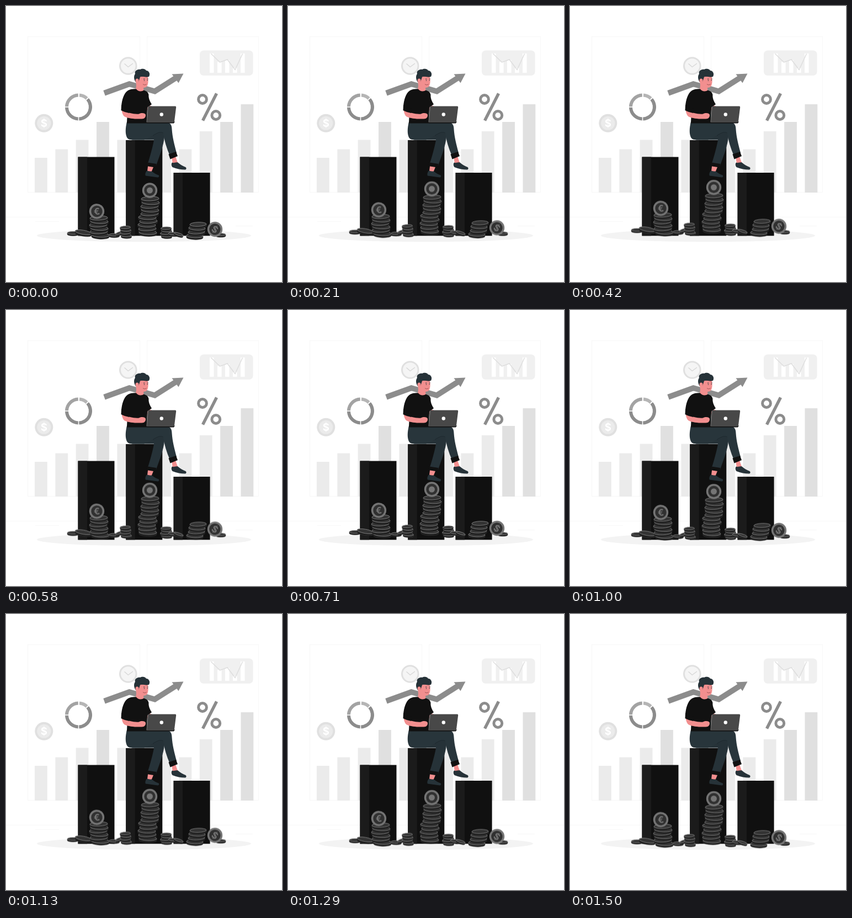
Write an HTML page that moves like this. It is 500x500 px and loops after 1540 ms.

```html
<!DOCTYPE html>
<html lang="en">
<head>
<meta charset="utf-8">
<title>Growth</title>
<style>
  html, body { margin: 0; width: 100%; height: 100%; overflow: hidden; background: #fff; }
  svg { display: block; width: 100%; height: 100%; }
  text { font-family: Inter, "Liberation Sans", sans-serif; font-weight: 700; text-anchor: middle; }
  #coins { animation: bob 1540ms linear -65ms infinite; }
  @keyframes bob {
    0%, 100% { transform: translateY(.85px); }
    50% { transform: translateY(-9.15px); }
  }
</style>
</head>
<body>
<svg viewBox="0 0 500 500">
  <!-- wall -->
  <g fill="none" stroke="#f7f7f7" stroke-width="1">
    <rect x="39.5" y="55.5" width="203" height="282"/>
    <rect x="255.5" y="55.5" width="202" height="282"/>
    <path d="M0 382.5H500M416 398.5H447M53 390.5H96"/>
  </g>
  <g id="bars"></g>

  <rect x="351" y="80.500" width="96.500" height="45.500" rx="7" fill="#f0f0f0"/>
  <path fill="#fff" d="M369 86h7.500v35H369zM383 101h7.500v20H383zM397 98h7.500v23H397zM411 112h7.500v9H411zM425 86h7.500v35H425z"/>
  <path d="M371.500 86.500L387.500 102L401 97L415 115.500L428.500 86.500" fill="none" stroke="#dedede" stroke-width="1.500"/>

  <circle cx="221.300" cy="108.500" r="14.800" fill="#f5f5f5" stroke="#e0e0e0" stroke-width="3"/>
  <path d="M214.500 104.500L221.300 110.500L230 104" fill="none" stroke="#d6d6d6" stroke-width="1.200"/>

  <circle cx="68.800" cy="212.300" r="16.500" fill="#e0e0e0"/>
  <circle cx="68.800" cy="212.300" r="12.500" fill="#ebebeb"/>
  <text x="68.800" y="219" font-size="18.500" fill="#fff">$</text>

  <g fill="none" stroke="#8c8c8c">
    <path d="M178 157.800L223.500 141.200L269.500 154.500L309 129.500" stroke-width="10"/>
    <path d="M300.500 123.500L321.500 122.500L312.500 139.500z" fill="#8c8c8c" stroke="none"/>
    <g stroke-width="5">
      <circle cx="356" cy="169" r="7.400"/>
      <circle cx="380.300" cy="198" r="7.400"/>
      <path d="M381.500 158.500L356.500 207.500" stroke-width="5.500"/>
    </g>
  </g>
  <g id="donut" fill="none" stroke-width="6"></g>

  <ellipse cx="250" cy="416" rx="194" ry="11.300" fill="#f3f3f3"/>
  <g id="towers"></g>

  <!-- person -->
  <g>
    <path d="M258 283L269 287L263.500 300.500L256 299z" fill="#f28f8f"/>
    <path d="M300 273L306.500 271L311.500 285L302 286z" fill="#f28f8f"/>
    <path d="M255.500 298C260 300.500 263 299 265 300C268 303 272 305 276.500 306.500C278 308 277 310.500 275 310.500L253 307.500C251.500 305 253 300 255.500 298z" fill="#263238"/>
    <path d="M301 283.500C305 285 309 282.500 311.500 283.500C315 287 320 290 325.500 292C327.500 294 326.500 296.500 324.500 296.500C317 296.500 309 295 301.500 292C299 289 299.500 285 301 283.500z" fill="#263238"/>

    <path d="M219 210C216 222 216 232 219 238C221 242 226 242.500 232 242.500L268 242.500C266 255 261 272 257 285L272 289C278 272 286 252 287 236L280 212z" fill="#263238"/>
    <path d="M219 210H288C297 210 300.500 215 300.500 223C301.500 238 305 251 309 266L297 271.500C291 258 287 244 284.500 230C274 226 262 239 250 242.500H232C220 242.500 216 238 219 210z" fill="#28353b"/>
    <path d="M284.500 230C280 227 273 230 266 235" fill="none" stroke="#1c262b" stroke-width=".8"/>
    <path d="M256 283.500L272.500 286L270.500 292.500L254.500 290z" fill="#111"/>
    <path d="M294.500 268.500L308 264L311 272L297.500 277.500z" fill="#111"/>

    <path d="M253 178L264 181.500L259 190L252 188z" fill="#f28f8f"/>
    <path d="M234 131C236 141 237 146 234.500 151C236 156.500 245 158.500 249.500 153.500L249 146z" fill="#f28f8f"/>
    <path d="M221 153C226 150.500 231 150 236 150.500C239 154.500 245 156 249.500 152.500C255 154 258 157 258.500 161C258 166 260 172 264 178L256 184L255 211H219L220 190L209 181C210 171 213 158 221 153z" fill="#111"/>
    <path d="M209.500 180L221 192L223 193.500C231 195.500 237 196 241 195.500C246 193 252 194 253 197C253.500 201 251 204.500 246 204.500C235 205 222 204 215 200.500C210 197 209 188 209.500 180z" fill="#f28f8f"/>
    <path d="M209 179C213 183 221 186 225 185L223 194C218 193 212 191 208.500 189z" fill="#111"/>

    <path d="M238 126C242 123 255 123 257 128C258 135 258 142 255 146C251 149.500 243 148 239 143z" fill="#f28f8f"/>
    <path d="M235 138C231 132 231.500 126 234 123C232 118 238 114 243 115C247 112.500 253 114 254 117C259 117 262 123 259 128C254 130 248 127 243 128.500C242 132 241 135 240 137z" fill="#263238"/>
    <ellipse cx="237.500" cy="135" rx="3" ry="3.500" fill="#f28f8f"/>
    <path d="M249 132.300h2.500M255.500 132h2" stroke="#263238" stroke-width=".9"/>
    <circle cx="250.500" cy="135" r=".8" fill="#263238"/>
    <circle cx="256.300" cy="134.500" r=".7" fill="#263238"/>
    <path d="M248 141.500C250 143.500 253 143 254.500 141.500" fill="none" stroke="#8e4747" stroke-width=".9"/>

    <path d="M219 209.500H306L304 212.500H219z" fill="#111"/>
    <path d="M259 181.500H306.500Q308.500 181.500 308.200 183.500L305 209Q304.800 211 302.500 211H254.500L256.500 184Q256.700 181.500 259 181.500z" fill="#484848"/>
    <path d="M257.500 182L255 210" stroke="#777" stroke-width=".8"/>
    <circle cx="281.800" cy="196.500" r="3.200" fill="#fff"/>
  </g>

  <g id="coins"></g>
</svg>
<script>
  const $ = id => document.getElementById(id);
  const rect = (x, y, w, bottom, fill) =>
    `<rect x="${x}" y="${y}" width="${w}" height="${bottom - y}" fill="${fill}"/>`;

  const tops = [275, 259.5, 242.5, 210, 242.5, 242.5, 242.5, 259.5, 227, 210, 178];
  $('bars').innerHTML = tops.map((y, i) =>
    rect(52 + i * 37.35, y, 22.8, 338, [3, 9, 10].includes(i) ? '#e0e0e0' : '#ebebeb')).join('');

  $('towers').innerHTML = [[130.5, 273.5], [217.3, 243], [303.6, 302]].map(([x, y]) =>
    rect(x, y, 66, 416.3, '#101010') + rect(x, y, 16.5, 416.3, '#1b1b1b')).join('');

  const arc = (a, b, color) => {
    const at = d => {
      const r = d * Math.PI / 180;
      return `${131.5 + 21.5 * Math.cos(r)} ${183 + 21.5 * Math.sin(r)}`;
    };
    return `<path d="M${at(a)}A21.5 21.5 0 ${b - a > 180 ? 1 : 0} 1 ${at(b)}" stroke="${color}"/>`;
  };
  $('donut').innerHTML = arc(182, 268, '#a3a3a3') + arc(274, 314, '#b5b5b5') +
    arc(319, 448, '#8c8c8c') + arc(92, 178, '#8c8c8c');

  // flat coin: dark edge with a light rim on the face
  const flat = (x, y, r, tilt = 0) => {
    const ry = r * .25, h = r > 12 ? 3.4 : 2.8;
    return `<g transform="translate(${x} ${y}) rotate(${tilt})">
      <path d="M${-r} 0v${h}a${r} ${ry} 0 0 0 ${2 * r} 0v${-h}z" fill="#1a1a1a" stroke="#454545" stroke-width=".5"/>
      <ellipse rx="${r}" ry="${ry}" fill="#333" stroke="#858585" stroke-width=".9"/></g>`;
  };
  // coins listed by x from the top down, painted from the bottom up
  const stack = (xs, y, step, r) =>
    xs.map((x, i) => flat(x, y + i * step, r, i % 2 ? 2 : -2)).reverse().join('');
  const upright = (x, y, tilt, mark) =>
    `<g transform="translate(${x} ${y}) rotate(${tilt})">
      <circle r="13.7" fill="#757575"/><circle r="10.2" fill="#303030"/>${mark}</g>`;
  const sign = s => `<text y="6" font-size="16.5" fill="#757575">${s}</text>`;

  $('coins').innerHTML =
    flat(121.5, 411, 10.5) + flat(140, 410, 15, 10) +
    stack([168, 169, 167, 169, 168, 171], 384, 6.2, 16) +
    flat(196, 414.5, 9.5) + flat(206, 411, 8, -18) +
    stack([216, 217, 216, 218], 401, 5, 9.5) +
    stack([261, 262, 260, 261, 260, 256, 258, 255, 256, 257], 349, 6.8, 16) +
    stack([290, 291, 289, 291], 402.5, 4.6, 9.5) +
    flat(304, 412.5, 10, 3) + flat(313, 413.5, 8.5, 18) +
    stack([348, 346, 345, 342], 395.5, 6.9, 15) +
    flat(389, 414, 9) +
    upright(164.5, 372, -6, sign('€')) +
    upright(260.5, 334, 0, '<circle r="5.5" fill="#757575"/>') +
    upright(378.5, 404.5, 32, sign('$'));
</script>
</body>
</html>
```
